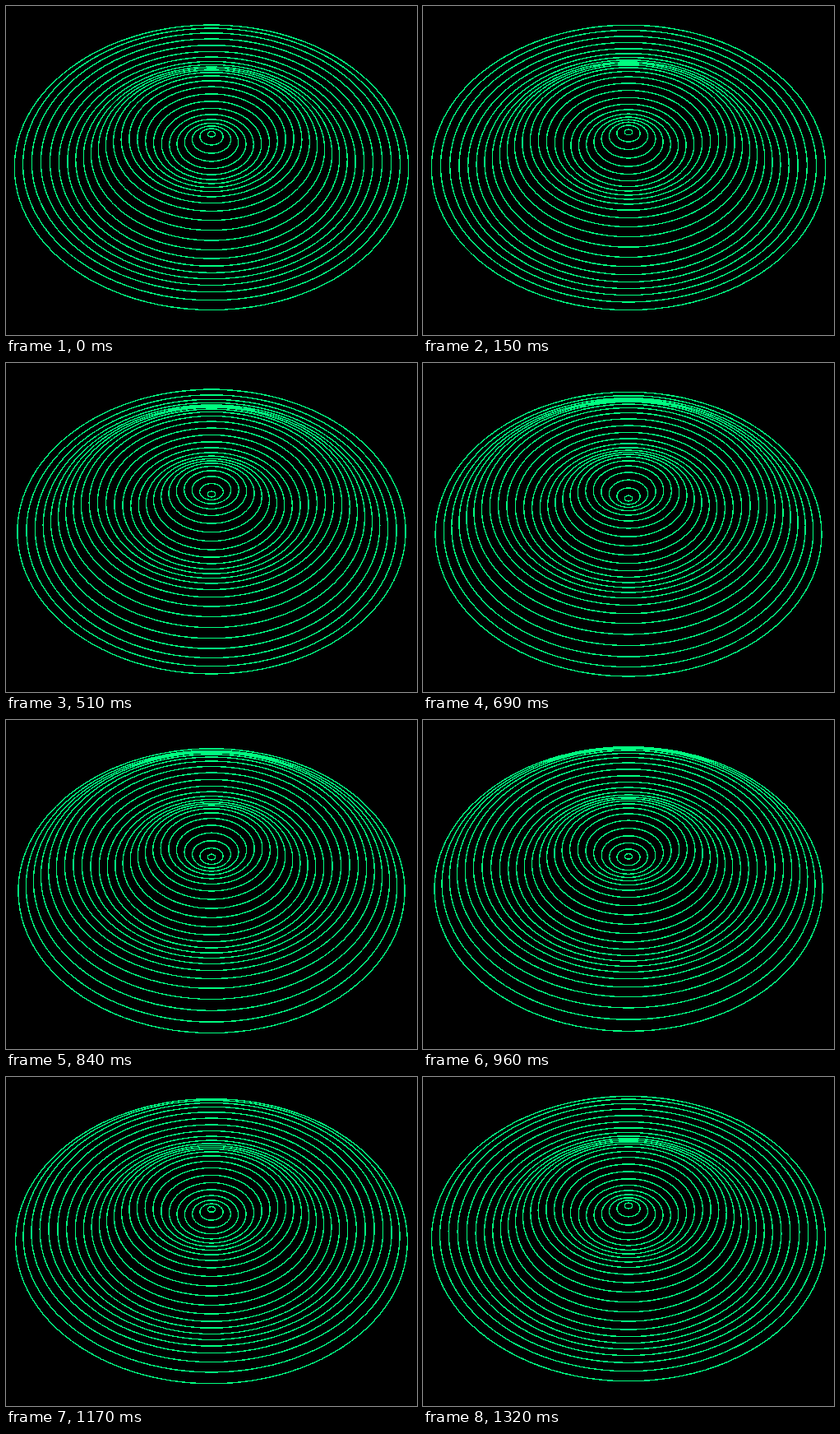
Write an HTML page with a canvas that moves like this. It is 500 px wide and 400 px high and loops after 1.35 s.

```html
<!DOCTYPE html>
<html lang="en">
<head>
<meta charset="utf-8">
<title>Ripple rings</title>
<style>
  html, body { margin: 0; width: 100%; height: 100%; overflow: hidden; background: #000; }
  canvas { display: block; width: 500px; height: 400px; image-rendering: pixelated; }
</style>
</head>
<body>
<canvas id="stage" width="500" height="400"></canvas>
<script>
const W = 500, H = 400;
const LOOP = 1350, STEP = 30;
const RINGS = 25, SEGMENTS = 120;
const TILT = Math.SQRT1_2;          // sine and cosine of 45 degrees
const DISTANCE = 710, FOCAL = 667;
const AMPLITUDE = 10, START = 0.88, LAG = 0.5;
const BLACK = 0xff000000, GREEN = 0xff80ff00; // ABGR

const ctx = document.getElementById('stage').getContext('2d', { willReadFrequently: true });
ctx.strokeStyle = '#00ff80';
ctx.lineWidth = 1.4;

function project(r, angle, height) {
  const u = r * Math.cos(angle), v = r * Math.sin(angle);
  const k = FOCAL / (DISTANCE - TILT * (v + height));
  return [250 + u * k, 160 + TILT * (v - height) * k];
}

function ring(r, height) {
  ctx.beginPath();
  for (let s = 0; s < SEGMENTS; s++) {
    ctx.lineTo(...project(r, s / SEGMENTS * 2 * Math.PI, height));
  }
  ctx.closePath();
  ctx.stroke();
}

// Reduce the smooth strokes to two flat colours
function harden() {
  const image = ctx.getImageData(0, 0, W, H);
  const pixels = new Uint32Array(image.data.buffer);
  for (let i = 0; i < pixels.length; i++) {
    pixels[i] = image.data[4 * i + 1] > 127 ? GREEN : BLACK;
  }
  ctx.putImageData(image, 0, 0);
}

function draw(step) {
  const phase = step * STEP / LOOP * 2 * Math.PI;
  ctx.fillRect(0, 0, W, H);
  for (let i = 0; i < RINGS; i++) {
    ring(5 + 10 * i, AMPLITUDE * Math.cos(phase - START - LAG * i));
  }
  harden();
}

let shown = -1;
function tick() {
  const step = Math.floor(performance.now() % LOOP / STEP);
  if (step !== shown) draw(shown = step);
  requestAnimationFrame(tick);
}
tick();
</script>
</body>
</html>
```
